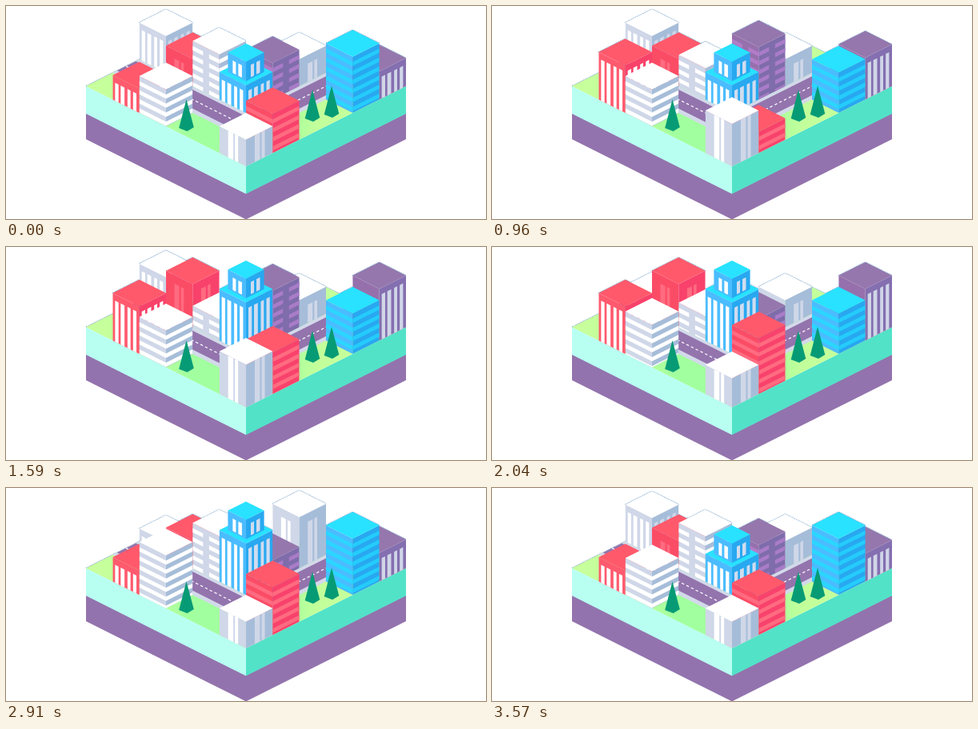
Write an HTML page that moves like this. It is 600x267 px and loops after 3600 ms.

```html
<!DOCTYPE html>
<html lang="en">
<head>
<meta charset="utf-8">
<title>Isometric city</title>
<style>
html, body { margin: 0; width: 100%; height: 100%; overflow: hidden; background: #fff; }
svg { display: block; width: 600px; height: 267px; }
</style>
</head>
<body>
<svg id="city" viewBox="0 0 600 267"></svg>
<script>
const LOOP = 3600, W = 33.33, H = 16.75, SLOPE = H / W, TALL = 110;
const svg = document.getElementById('city');

function add(parent, tag, attrs) {
  const node = document.createElementNS('http://www.w3.org/2000/svg', tag);
  for (const key in attrs) node.setAttribute(key, attrs[key]);
  parent.appendChild(node);
  return node;
}
const group = (parent, attrs = {}) => add(parent, 'g', attrs);
const poly = (parent, points, fill) => add(parent, 'polygon', { points: points.join(' '), fill });
const rect = (parent, x, y, width, height, fill) => add(parent, 'rect', { x, y, width, height, fill });

// Grid position to stage position
const at = (i, j, drop = 0) => [300 + (i - j) * W, (i + j) * H + drop];
const tiles = (parent, cells, fill) => poly(parent, cells.map(c => at(...c)), fill);

const defs = add(svg, 'defs');
const fringe = group(svg, {
  fill: 'none', stroke: '#6f9cc4', 'stroke-width': 1.5, 'stroke-dasharray': '1.2 .8'
});
const ground = group(svg);
const town = group(svg);

function drawGround() {
  const lawn = add(defs, 'linearGradient', {
    id: 'lawn', gradientUnits: 'userSpaceOnUse', x1: 100, y1: 0, x2: 500, y2: 0
  });
  [[0, '#c8ff9c'], [.2, '#c0ff9b'], [.32, '#a2ff9f'], [.62, '#a2ff9f'], [.72, '#c2ff9b'], [1, '#c8ff9c']]
    .forEach(([offset, color]) => add(lawn, 'stop', { offset, 'stop-color': color }));

  const layer = (a, b, top, bottom, fill) =>
    poly(ground, [at(...a, top), at(...b, top), at(...b, bottom), at(...a, bottom)], fill);
  layer([0, 6], [6, 6], 34, 66.5, '#9373ad');
  layer([6, 6], [6, 0], 34, 66.5, '#9373ad');
  layer([0, 6], [6, 6], 0, 34.5, '#b8fff2');
  layer([6, 6], [6, 0], 0, 34.5, '#52e2c8');
  tiles(ground, [[0, 3], [0, 6], [6, 6], [6, 0], [3, 0], [3, 3]], 'url(#lawn)');

  const bend = (near, far, fill) =>
    tiles(ground, [[0, near], [0, far], [far, far], [far, 0], [near, 0], [near, near]], fill);
  bend(4, 5, '#d3d9ea');
  bend(4.13, 4.84, '#9374ad');
  add(ground, 'polyline', {
    points: [at(0, 4.5), at(4.5, 4.5), at(4.5, 0)].join(' '),
    fill: 'none', stroke: '#fff', 'stroke-width': 1.2, 'stroke-dasharray': '3.5 3'
  });

  [[[0, 6], [0, 3]], [[3, 0], [6, 0]]].forEach(([a, b]) =>
    add(fringe, 'polyline', { points: [at(...a), at(...b)].join(' ') }));
}

// Facade patterns, drawn in face coordinates: x along the wall, y down from the roof
const strips = (list, top, height = TALL) => (face, color) =>
  list.forEach(([x, w]) => rect(face, x, top, w, height, color));

const bands = (list = [[0, W]]) => (face, color) => {
  for (let y = 6.5; y < TALL; y += 11.3)
    list.forEach(([x, w]) => rect(face, x, y, w, 5.3, color));
};

const four = strips([[3, 4.3], [10, 4.8], [18.5, 3.8], [25.5, 4.2]], 8);
const pair = strips([[10.5, 6], [18.7, 3.6]], 11);
const fullPair = strips([[11, 6.5], [19.5, 4]], 0);
const split = bands([[0, 13], [20.5, W - 20.5]]);
const upper = strips([[6, 4], [13, 4.5]], 7, 15.5);

// Palette: roof, left wall, right wall, left detail, right detail
const WHITE = ['#fff', '#cfd7e8', '#a6bdd9', '#fff', '#cfd7e8'];
const PAPER = ['#fff', '#cfd7e8', '#a6bdd9', '#fff', '#fff'];
const POST = ['#ff596b', '#ff5a6e', '#f8426a', '#fff', '#fff'];
const RED = ['#ff596b', '#fb4c66', '#f8426c', '#ff6b80', '#ff6b80'];
const CYAN = ['#28e2ff', '#4bbcff', '#28a8f0', '#2bd6ff', '#24ccfb'];
const TOWER = ['#28e2ff', '#4bbcff', '#28a8f0', '#fff', '#cfdcf0'];
const PLUM = ['#9577ad', '#9670ac', '#7f6cab', '#b27cc8', '#a97cc8'];
const OFFICE = ['#9577ad', '#9670ac', '#846fb0', '#9670ac', '#d0d6e8'];

function block(parent, size, height, colors, pattern) {
  const rise = size * SLOPE;
  const wall = (x, y, slope, fill, detail) => {
    const face = group(parent, { transform: `matrix(1 ${slope} 0 1 ${x} ${y})` });
    rect(face, 0, 0, size, height, fill);
    pattern(face, detail);
  };
  wall(-size, rise, SLOPE, colors[1], colors[3]);
  wall(0, 2 * rise, -SLOPE, colors[2], colors[4]);
  poly(parent, [[0, 0], [size, rise], [0, 2 * rise], [-size, rise]], colors[0]);
}

// start: roof apex at time 0; moves: [begin, apex afterwards]
const buildings = [
  { i: 0, j: 3, colors: WHITE, pattern: four, start: 4, moves: [[1560, 34], [2930, 4]] },
  { i: 1, j: 3, colors: RED, pattern: pair, start: 33, moves: [[980, 13], [2360, 33]] },
  { i: 3, j: 1, colors: WHITE, pattern: pair, start: 33, moves: [[2170, 3], [3000, 33]] },
  { i: 2, j: 3, colors: PAPER, pattern: split, start: 27, moves: [[630, 57], [1900, 27]] },
  { i: 3, j: 2, colors: PLUM, pattern: split, start: 38, moves: [[170, 18], [1480, 57], [2950, 38]] },
  { i: 5, j: 0, colors: OFFICE, pattern: four, start: 48.5, moves: [[630, 19], [2370, 48.5]] },
  { i: 3, j: 3, colors: TOWER, pattern: four, start: 66, top: true, moves: [[980, 36], [3000, 66]] },
  { i: 1, j: 5, colors: POST, pattern: four, start: 70, moves: [[0, 41], [2170, 70]] },
  { i: 5, j: 1, colors: CYAN, pattern: bands(), start: 30, moves: [[200, 50], [2160, 30]] },
  { i: 2, j: 5, colors: PAPER, pattern: bands(), start: 71, moves: [[1800, 51], [2930, 71]] },
  { i: 5, j: 4, colors: RED, pattern: bands(), start: 102, moves: [[0, 124], [1260, 81], [2620, 102]] },
  { i: 5, j: 5, colors: WHITE, pattern: fullPair, start: 134, moves: [[400, 114], [1590, 134]] }
];

function build(b, n) {
  const [x] = at(b.i, b.j);
  const clip = add(defs, 'clipPath', { id: 'plot' + n });
  poly(clip, [[x - W - .4, -50], [x + W + .4, -50],
    at(b.i + 1, b.j), at(b.i + 1, b.j + 1), at(b.i, b.j + 1)], '#000');
  const plot = group(town, { 'clip-path': `url(#plot${n})` });
  const body = group(plot);
  block(body, W, TALL, b.colors, b.pattern);
  if (b.top) block(group(body, { transform: 'translate(0 -19)' }), 22.6, 24.5, b.colors, upper);
  const edge = add(fringe, 'polyline', { points: `${-W},${H} 0,0 ${W},${H}` });
  b.place = y => [body, edge].forEach(node =>
    node.setAttribute('transform', `translate(${x} ${y.toFixed(2)})`));
}

function tree(x, y) {
  poly(town, [[x, y], [x + 9.3, y + 35], [x + 1, y + 40], [x - 9.3, y + 36]], '#079b75');
}

const MOVE = 600;
const ease = u => (1 - Math.cos(Math.PI * Math.min(1, Math.max(0, u)))) / 2;

function apex(b, t) {
  let y = b.start;
  for (const [begin, to] of b.moves) y += (to - y) * ease((t - begin) / MOVE);
  return y;
}

function render(t) {
  buildings.forEach(b => b.place(apex(b, t)));
}

drawGround();
buildings.forEach(build);
[[225.5, 117], [383, 105], [407, 100]].forEach(p => tree(...p));

render(0);
const begin = performance.now();
requestAnimationFrame(function tick() {
  render((performance.now() - begin) % LOOP);
  requestAnimationFrame(tick);
});
</script>
</body>
</html>
```
